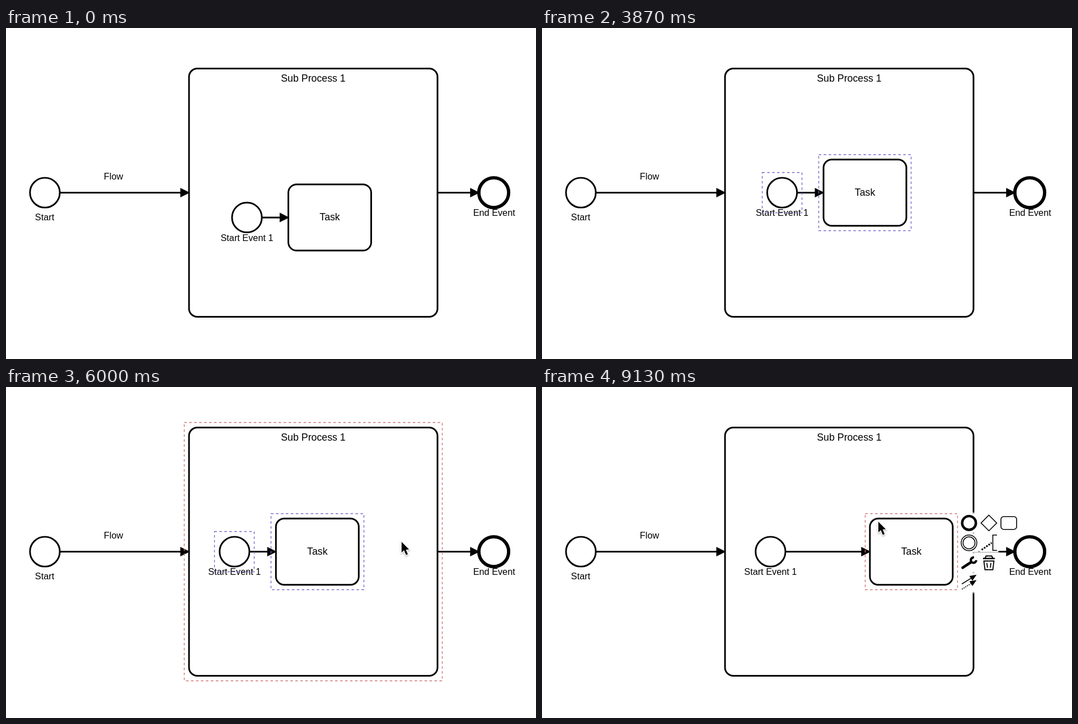
An HTML page with a canvas for the animation above (9190 ms loop, 947 px wide and 592 px high).

```html
<!DOCTYPE html>
<html lang="en">
<head>
<meta charset="utf-8">
<title>Process diagram editing</title>
<style>
html, body { margin: 0; width: 100%; height: 100%; overflow: hidden; background: #fff; }
canvas { display: block; }
</style>
</head>
<body>
<canvas id="stage" width="947" height="592"></canvas>
<script>
const ctx = document.getElementById('stage').getContext('2d');
const LOOP = 9190;
const TICK = 200 / 3;          // the picture steps 15 times a second
const U = 1.48;                // zoom of the diagram
const R = 18 * U;              // radius of an event
const MID = 294.5;
const RED = '#cf7272', BLUE = '#7468cc', INK = '#000';
const SUB = { x: 327, y: MID - 150 * U, w: 300 * U, h: 300 * U };

const clamp = (v, lo, hi) => Math.min(hi, Math.max(lo, v));
const easeOut = k => 1 - (1 - k) ** 2;
const easeIn = k => k * k;

// Number of key presses so far: one every `gap` ticks, at most `max`
const presses = (s, first, gap, max) => clamp(Math.floor((s - first) / gap) + 1, 0, max);

// Glides of the pointer; it rests at the end of one until `until`
const GLIDES = [
  { at: 6, end: 10, until: 15, from: [793, 345], to: [595, 345], ease: easeOut },
  { at: 15, end: 22, until: 25, from: [595, 345], to: [428, 325], ease: easeOut },
  { at: 25, end: 31, until: 32, from: [428, 325], to: [925, 356], ease: easeIn },
  { at: 87, end: 94.3, until: 139, from: [906, 345], to: [601, 241], ease: easeOut }
];

function pointer(s) {
  const g = GLIDES.find(g => s >= g.at && s < g.until);
  if (!g) return null;
  const k = g.ease(clamp((s - g.at) / (g.end - g.at), 0, 1));
  const [x, y] = g.from.map((v, i) => v + (g.to[i] - v) * k);
  return { x, y };
}

const inside = (p, r) =>
  p && p.x > r.x && p.x < r.x + r.w && p.y > r.y && p.y < r.y + r.h;

function trace(points, close) {
  ctx.beginPath();
  points.forEach(([x, y]) => ctx.lineTo(x, y));
  if (close) ctx.closePath();
}

function line(points, width, dash = []) {
  trace(points);
  ctx.lineWidth = width;
  ctx.setLineDash(dash);
  ctx.stroke();
  ctx.setLineDash([]);
}

function circle(x, y, r, width) {
  ctx.beginPath();
  ctx.arc(x, y, r, 0, 7);
  ctx.lineWidth = width;
  ctx.stroke();
}

function box(r, radius, width) {
  ctx.beginPath();
  ctx.roundRect(r.x, r.y, r.w, r.h, radius);
  ctx.lineWidth = width;
  ctx.stroke();
}

function text(str, x, y, units) {
  ctx.font = units * U + 'px "Liberation Sans", Arial, sans-serif';
  ctx.fillText(str, x, y);
}

function flow(x1, x2, y) {
  line([[x1, y], [x2 - 2, y]], 2 * U);
  trace([[x2 - 10 * U, y - 5 * U], [x2, y], [x2 - 10 * U, y + 5 * U]], true);
  ctx.fill();
  ctx.lineWidth = U;
  ctx.stroke();
}

function outline(r, color) {
  const gap = 6 * U, snap = v => Math.floor(v) + 0.5;
  const x = snap(r.x - gap), y = snap(r.y - gap);
  ctx.strokeStyle = color;
  ctx.lineWidth = 1.4;
  ctx.setLineDash([3 * U, 3 * U]);
  ctx.strokeRect(x, y, snap(r.x + r.w + gap) - x, snap(r.y + r.h + gap) - y);
  ctx.setLineDash([]);
  ctx.strokeStyle = INK;
}

// Small arrow rising to the right, `y` is the height of its tip
function rising(y, dash) {
  ctx.save();
  ctx.translate(13.5, y);
  ctx.rotate(-Math.PI / 5.6);
  line([[-31, 0], [-8, 0]], 1.5, dash);
  trace([[0, 0], [-12, 5], [-12, -5]], true);
  ctx.fill();
  ctx.restore();
}

function endEvent() {
  circle(0, 0, 12.3, 4.4);
}

function gateway() {
  trace([[0, -14], [14, 0], [0, 14], [-14, 0]], true);
  ctx.lineWidth = 1.6;
  ctx.stroke();
}

function taskBox() {
  box({ x: -14, y: -11.5, w: 28, h: 23 }, 5, 1.6);
}

function middleEvent() {
  circle(0, 0, 14, 1.5);
  circle(0, 0, 10.7, 1.5);
}

function note() {
  line([[-13, 12.5], [5, 0]], 3, [3, 2]);
  line([[14.5, -14], [7, -14], [7, 13.5], [14.5, 13.5]], 1.6);
}

function wrench() {
  ctx.lineCap = 'round';
  line([[-11.5, 9], [3, -0.5]], 4.6);
  ctx.lineCap = 'butt';
  ctx.beginPath();
  ctx.arc(8, -4.6, 4.7, 0, 4.9);
  ctx.lineWidth = 4.2;
  ctx.stroke();
}

function trash() {
  line([[-10.5, -7.5], [10.5, -7.5]], 2.6);
  for (const side of [-1, 1]) {
    line([[0, -12], [5 * side, -12], [7 * side, -8]], 2);
    line([[0, -3], [9 * side, -3], [7 * side, 12.5], [0, 12.5]], 1.8);
    line([[3.6 * side, 0.5], [2.6 * side, 9]], 1.8);
  }
}

function connect() {
  rising(-14, []);
  rising(-4.5, [2, 1.6]);
}

const PAD = [[endEvent, gateway, taskBox], [middleEvent, note], [wrench, trash], [connect]];

// White cell with a soft halo that is cast from off the stage
function cell() {
  const half = 11 * U, grown = half + U, far = 3000;
  ctx.fillStyle = '#fefefe';
  ctx.shadowColor = '#fefefe';
  ctx.shadowBlur = 2 * U;
  ctx.shadowOffsetX = far;
  ctx.fillRect(-grown - far, -grown, 2 * grown, 2 * grown);
  ctx.shadowColor = 'transparent';
  ctx.fillRect(-half, -half, 2 * half, 2 * half);
  ctx.fillStyle = INK;
}

function pad(task) {
  const pitch = 24 * U;
  PAD.forEach((icons, row) => icons.forEach((draw, col) => {
    ctx.save();
    ctx.translate(task.x + task.w + 29.1 + col * pitch, task.y + 7.9 + row * pitch);
    cell();
    draw();
    ctx.restore();
  }));
}

function arrow({ x, y }) {
  ctx.save();
  ctx.translate(x, y);
  trace([[0, 0], [0, 19], [4.4, 15], [8, 23.4], [11.2, 22], [7.7, 13.8], [13.4, 13.4]], true);
  ctx.strokeStyle = '#fff';
  ctx.lineWidth = 2.6;
  ctx.shadowColor = 'rgba(0,0,0,.3)';
  ctx.shadowBlur = 3;
  ctx.shadowOffsetY = 1.5;
  ctx.stroke();
  ctx.shadowColor = 'transparent';
  ctx.fill();
  ctx.restore();
}

function render(t) {
  const s = Math.floor((t + 4) / TICK);
  const ups = presses(s, 41, 3, 3) * 10;
  const lefts = presses(s, 58, 1, 1) + presses(s, 65.125, 1.25, 14);
  const rights = (presses(s, 110, 3, 6) + presses(s, 130, 1, 1)) * 10;

  const sx = 430.5 - lefts * U, sy = MID + (30 - ups) * U;
  const start = { x: sx - R, y: sy - R, w: 2 * R, h: 2 * R };
  const task = { x: sx + (50 + rights) * U, y: sy - 40 * U, w: 100 * U, h: 80 * U };
  const link = { x: sx + R, y: sy - R, w: task.x - sx - R, h: 2 * R };

  ctx.fillStyle = '#fff';
  ctx.fillRect(0, 0, 947, 592);
  ctx.fillStyle = ctx.strokeStyle = INK;
  ctx.textAlign = 'center';

  circle(69.5, MID, R, 2 * U);
  box(SUB, 10 * U, 2 * U);
  circle(871.5, MID, R, 4 * U);
  flow(69.5 + R, SUB.x, MID);
  flow(SUB.x + SUB.w, 871.5 - R, MID);

  circle(sx, sy, R, 2 * U);
  flow(sx + R, task.x, sy);
  box(task, 10 * U, 2 * U);

  text('Start', 69, 343.6, 11);
  text('Flow', 192, 271, 11);
  text('End Event', 872.2, 336.2, 11);
  text('Sub Process 1', 549, 96.2, 12);
  text('Start Event 1', sx, sy + 41.8, 11);
  text('Task', task.x + task.w / 2, sy + 5.4, 12);

  const p = pointer(s);
  const hover = [task, start, link, SUB].find(e => inside(p, e));
  const chosen = [];
  if (s >= 11) chosen.push(task);
  if (s >= 26 && s < 96) chosen.push(start);
  chosen.filter(e => e !== hover).forEach(e => outline(e, BLUE));
  if (hover && hover !== link) outline(hover, RED);

  if ((s >= 11 && s < 14) || s >= 96) pad(task);
  if (p) arrow(p);
}

function loop(now) {
  render(now % LOOP);
  requestAnimationFrame(loop);
}
render(0);
requestAnimationFrame(loop);
</script>
</body>
</html>
```
